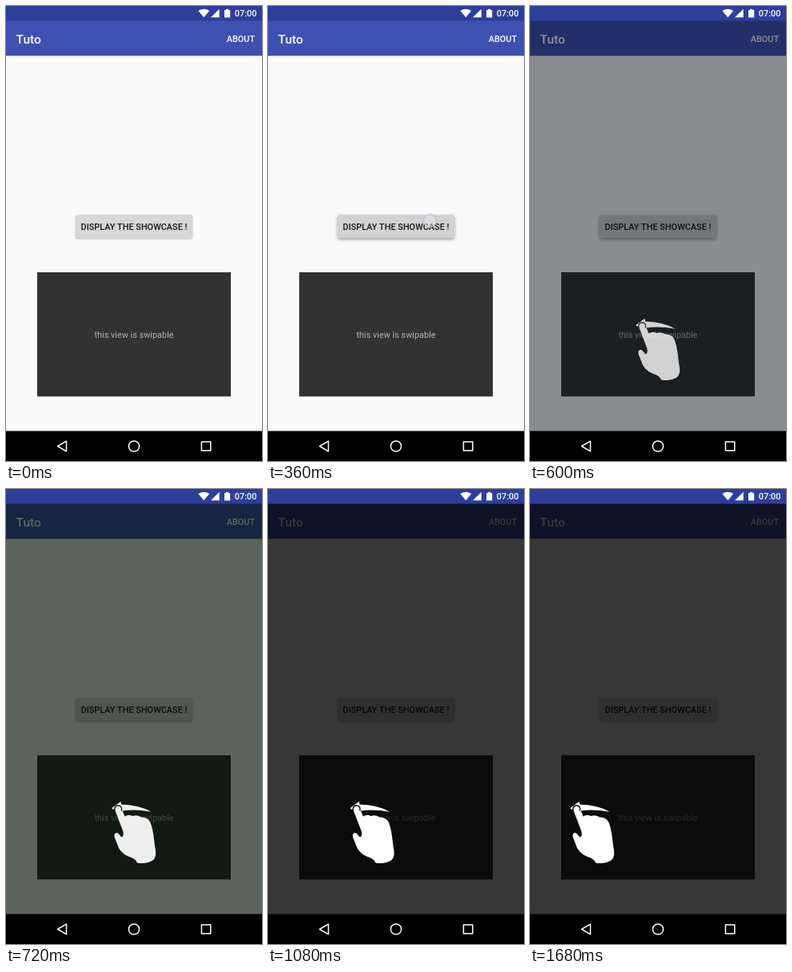
An HTML page with a canvas for the animation above (1800 ms loop, 320 px wide and 569 px high).

```html
<!DOCTYPE html>
<html lang="en">
<head>
<meta charset="utf-8">
<title>Showcase</title>
<style>
html, body { margin: 0; width: 100%; height: 100%; overflow: hidden; background: #000; }
canvas { display: block; width: 320px; height: 569px; }
</style>
</head>
<body>
<canvas id="stage"></canvas>
<script>
const W = 320, H = 569, LOOP = 1800, STEP = 120;
const canvas = document.getElementById('stage');
const ctx = canvas.getContext('2d');
const ratio = window.devicePixelRatio || 1;
canvas.width = W * ratio;
canvas.height = H * ratio;
ctx.scale(ratio, ratio);

const clamp = v => Math.max(0, Math.min(1, v));
const easeOut = p => 1 - (1 - p) ** 2;

// Dim colour and hand opacity by time, in ms.
const fade = [
  { at: 480, rgb: '0,0,0', dim: 0.16, hand: 0.4 },
  { at: 600, rgb: '0,8,14', dim: 0.45, hand: 0.8 },
  { at: 720, rgb: '0,12,0', dim: 0.63, hand: 0.93 },
  { at: 840, rgb: '0,4,0', dim: 0.72, hand: 1 },
  { at: 960, rgb: '0,0,0', dim: 0.77, hand: 1 },
  { at: 1080, rgb: '0,0,0', dim: 0.78, hand: 1 }
];

function rect(x, y, w, h, color) {
  ctx.fillStyle = color;
  ctx.fillRect(x, y, w, h);
}

function text(str, x, y, size, color, align = 'left', weight = 500) {
  ctx.font = `${weight} ${size}px Roboto, sans-serif`;
  ctx.textAlign = align;
  ctx.fillStyle = color;
  ctx.fillText(str, x, y);
}

function polygon(points) {
  ctx.beginPath();
  points.forEach(([x, y]) => ctx.lineTo(x, y));
  ctx.closePath();
}

function drawStatusBar() {
  rect(0, 0, W, 18.5, '#2e3e9a');
  ctx.fillStyle = '#fff';
  ctx.beginPath();
  ctx.moveTo(247.3, 14.3);
  ctx.lineTo(240.4, 6);
  ctx.quadraticCurveTo(247.3, 1.6, 254.2, 6);
  ctx.fill();
  polygon([[256, 14.3], [266.7, 14.3], [266.7, 3.8]]);
  ctx.fill();
  ctx.fillRect(273, 5, 7.2, 9.4);
  ctx.fillRect(275, 3.8, 3.2, 1.5);
  text('07:00', 313.5, 13.3, 10.9, '#fff', 'right');
}

function drawNavBar() {
  rect(0, 531.5, W, H - 531.5, '#000');
  ctx.strokeStyle = '#fff';
  ctx.lineWidth = 1.5;
  ctx.lineJoin = 'round';
  polygon([[64.5, 550.5], [75.5, 544.2], [75.5, 556.8]]);
  ctx.stroke();
  ctx.beginPath();
  ctx.arc(160, 550.5, 6.6, 0, Math.PI * 2);
  ctx.stroke();
  ctx.strokeRect(244.4, 545, 11.4, 11);
}

function drawButton(pressed) {
  ctx.save();
  ctx.shadowColor = `rgba(0,0,0,${pressed ? 0.42 : 0.32})`;
  ctx.shadowBlur = (pressed ? 4 : 2.5) * ratio;
  ctx.shadowOffsetY = (pressed ? 1.6 : 0.8) * ratio;
  ctx.fillStyle = pressed ? '#d2d2d3' : '#d6d7d7';
  ctx.beginPath();
  ctx.roundRect(87.3, 261.5, 145.4, 28.7, 1.6);
  ctx.fill();
  ctx.restore();
  text('DISPLAY THE SHOWCASE !', 160, 279.5, 10.9, '#151515', 'center');
}

function drawTouch(strength) {
  ctx.save();
  ctx.globalAlpha = strength;
  ctx.beginPath();
  ctx.arc(202.3, 269, 8.3, 0, Math.PI * 2);
  ctx.fillStyle = 'rgba(225,228,238,0.5)';
  ctx.fill();
  ctx.strokeStyle = 'rgba(165,172,200,0.65)';
  ctx.lineWidth = 1;
  ctx.stroke();
  ctx.restore();
}

// Swiping hand at its resting place on the left, moved right by dx.
function drawHand(dx, alpha) {
  ctx.save();
  ctx.translate(dx, 0);
  ctx.globalAlpha = alpha;
  ctx.fillStyle = '#fff';
  ctx.beginPath();
  ctx.moveTo(50, 399.3);
  ctx.lineTo(61.5, 390.8);
  ctx.lineTo(62, 394.6);
  ctx.quadraticCurveTo(84, 394.8, 99.5, 403.8);
  ctx.quadraticCurveTo(80, 400.2, 63, 402.5);
  ctx.lineTo(61, 406);
  ctx.closePath();
  ctx.moveTo(54.2, 401.5);
  ctx.bezierCurveTo(53.5, 395.5, 61, 394.8, 62.5, 400);
  ctx.lineTo(66.5, 409.5);
  ctx.quadraticCurveTo(71, 406.5, 76, 409);
  ctx.quadraticCurveTo(82, 407, 87, 410.5);
  ctx.quadraticCurveTo(95, 410, 98.5, 417);
  ctx.bezierCurveTo(103, 429, 103, 442, 105, 452);
  ctx.quadraticCurveTo(106, 460, 102, 464);
  ctx.quadraticCurveTo(94, 469.5, 82, 467.5);
  ctx.quadraticCurveTo(80, 462, 71, 459.5);
  ctx.quadraticCurveTo(60, 455, 57, 444);
  ctx.lineTo(53.5, 435);
  ctx.quadraticCurveTo(52.8, 429.5, 57.5, 430);
  ctx.lineTo(62.5, 435.5);
  ctx.quadraticCurveTo(65.8, 434, 64.3, 428);
  ctx.closePath();
  ctx.fill();
  ctx.strokeStyle = '#111';
  ctx.lineWidth = 1.5;
  ctx.beginPath();
  ctx.arc(58.2, 400.3, 4.5, Math.PI * 0.85, Math.PI * 2.15);
  ctx.stroke();
  ctx.restore();
}

function draw(t) {
  const touching = t >= 240 && t < 480;
  const stage = fade.findLast(s => t >= s.at);

  rect(0, 0, W, H, '#fafafb');
  rect(0, 18, W, 44.3, '#3f50b3');
  text('Tuto', 12.5, 46.7, 15.56, '#fff');
  text('ABOUT', 311, 45, 10.9, '#fff', 'right');
  drawButton(t >= 360 && t < 720);
  if (touching) drawTouch(t < 360 ? 0.6 : 1);
  rect(39, 333, 242, 155.3, '#323233');
  text('this view is swipable', 160, 414.8, 10.9, '#b2b2b2', 'center', 400);

  if (stage) {
    rect(0, 18, W, 514, `rgba(${stage.rgb},${stage.dim})`);
    const swipe = easeOut(clamp((t - 960) / 600));
    drawHand(82 * (1 - swipe), stage.hand);
  }
  drawStatusBar();
  drawNavBar();
}

function tick() {
  const t = performance.now() % LOOP;
  draw(Math.floor(t / STEP) * STEP);
  requestAnimationFrame(tick);
}
tick();
</script>
</body>
</html>
```
